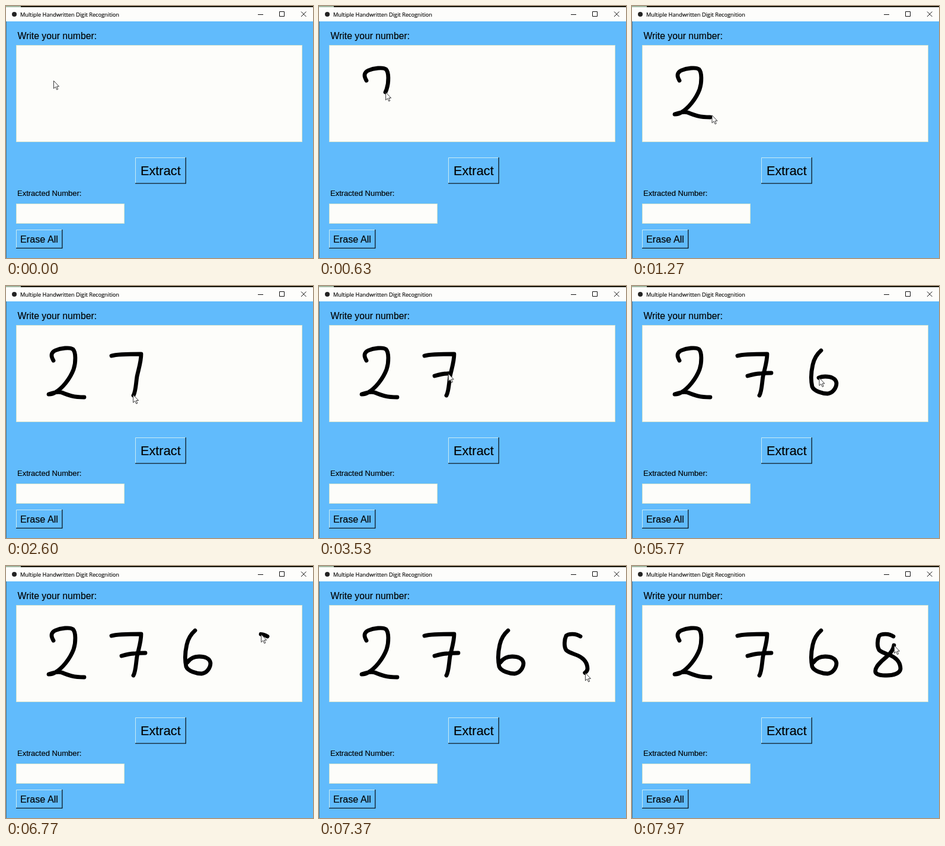
An HTML page that plays this animation: 518x426 px, repeating every 8 s.

```html
<!DOCTYPE html>
<html lang="en">
<head>
<meta charset="utf-8">
<title>Digit recognition</title>
<style>
  html, body { margin: 0; width: 100%; height: 100%; overflow: hidden; background: #61bbfc; }
  svg { display: block; width: 100%; height: 100%; }
  text { font-family: "Liberation Sans", Arial, sans-serif; fill: #000; stroke: #000; stroke-width: .15; }
  .title { font: 9.25px "Open Sans", sans-serif; }
  .icons { fill: none; stroke: #111; }
  .ink { fill: none; stroke: #000; stroke-width: 6.8; stroke-linecap: round; stroke-linejoin: round; }
  .light { fill: none; stroke: #c8ecf4; }
  .dark { fill: none; stroke: #0c1820; stroke-width: 1.3; }
  .field { fill: #fdfdfa; stroke: #d5e5cf; }
</style>
</head>
<body>
<svg viewBox="0 0 518 426">
  <rect width="518" height="426" fill="#61bbfc"/>
  <rect width="518" height="2" fill="#17160a"/>
  <rect width="25" height="2" fill="#a3bba6"/>
  <rect y="2" width="518" height="24" fill="#fdfdfb"/>
  <path d="M.5 26V426" stroke="#46789a"/>

  <circle cx="14" cy="14" r="4" fill="#222"/>
  <text class="title" x="24" y="17.5">Multiple Handwritten Digit Recognition</text>
  <path class="icons" d="M425 14.5h9M461.5 9.5h8v8h-8zM498 9.5l8.5 8.5M506.5 9.5l-8.5 8.5"/>

  <text x="19.5" y="56" font-size="15.75">Write your number:</text>
  <rect class="field" x="17.5" y="66.5" width="482" height="163"/>

  <path class="light" d="M218.5 300V256.5H303"/>
  <path class="dark" d="M218 299.8H303.3V256"/>
  <text x="260.8" y="286" font-size="21.8" text-anchor="middle">Extract</text>

  <text x="19" y="321" font-size="13">Extracted Number:</text>
  <rect class="field" x="17.5" y="334.5" width="182" height="33"/>

  <path class="light" d="M17.5 409V378.5H95"/>
  <path class="dark" d="M17 409.3H94.8V378"/>
  <text x="56" y="400" font-size="16.2" text-anchor="middle">Erase All</text>

  <g id="ink" class="ink"></g>
  <path id="cursor" d="M.5 .5V13.5L3.5 10.7L5.7 15.5L7.7 14.6L5.6 10H9.5Z" fill="#fff" stroke="#222" stroke-width=".9"/>
</svg>
<script>
const LOOP = 8000;

// Each pen stroke: start time, end time, path.
const strokes = [
  [150, 1260, "M80 126C76 119 75 113 83 109C92 105 108 103 113 107C118 112 118 129 114 141C108 157 95 173 83 180C79 183 75 183 72 183C80 180 87 178 94 180C106 185 114 188 132 188"],
  [1850, 2590, "M178 118C188 115 208 115 228 115C228 128 224 139 221 153C219 166 219 178 215 185"],
  [3330, 3680, "M195 152C202 150 209 148 216 148C224 147 230 147 235 147"],
  [4800, 5850, "M319 109C311 116 307 124 305 133C302 146 302 161 304 170C307 178 322 182 330 182C339 181 345 172 345 164C344 156 335 153 326 153C316 153 310 157 306 163"],
  [6700, 7970, "M441 119C434 114 421 114 417 118C414 124 413 136 417 142C422 147 432 149 438 152C448 157 453 165 453 174C452 182 440 185 430 185C422 185 414 185 411 180C409 173 416 166 422 160C430 153 440 146 442 134"],
].map(([start, end, d]) => {
  const path = document.createElementNS("http://www.w3.org/2000/svg", "path");
  path.setAttribute("d", d);
  document.getElementById("ink").append(path);
  const length = path.getTotalLength();
  const at = distance => path.getPointAtLength(distance);
  return { start, end, path, length, at };
});

const cursor = document.getElementById("cursor");
const easeOut = p => 1 - (1 - p) ** 3;

function penPosition(time) {
  const next = strokes.findIndex(s => time < s.end);
  if (next < 0) return strokes.at(-1).at(strokes.at(-1).length);
  const stroke = strokes[next];
  if (time >= stroke.start) {
    return stroke.at(stroke.length * (time - stroke.start) / (stroke.end - stroke.start));
  }
  const to = stroke.at(0);
  if (next === 0) return to;
  const previous = strokes[next - 1];
  const from = previous.at(previous.length);
  const p = easeOut((time - previous.end) / (stroke.start - previous.end));
  return { x: from.x + (to.x - from.x) * p, y: from.y + (to.y - from.y) * p };
}

function draw(now) {
  const time = now % LOOP;
  for (const { start, end, path, length } of strokes) {
    const progress = Math.min(1, (time - start) / (end - start));
    path.style.display = progress > 0 ? "" : "none";
    path.style.strokeDasharray = progress < 1 ? `${length * Math.max(0, progress)} ${length * 2}` : "none";
  }
  const { x, y } = penPosition(time);
  cursor.setAttribute("transform", `translate(${x} ${y})`);
  requestAnimationFrame(draw);
}
draw(performance.now());
</script>
</body>
</html>
```
